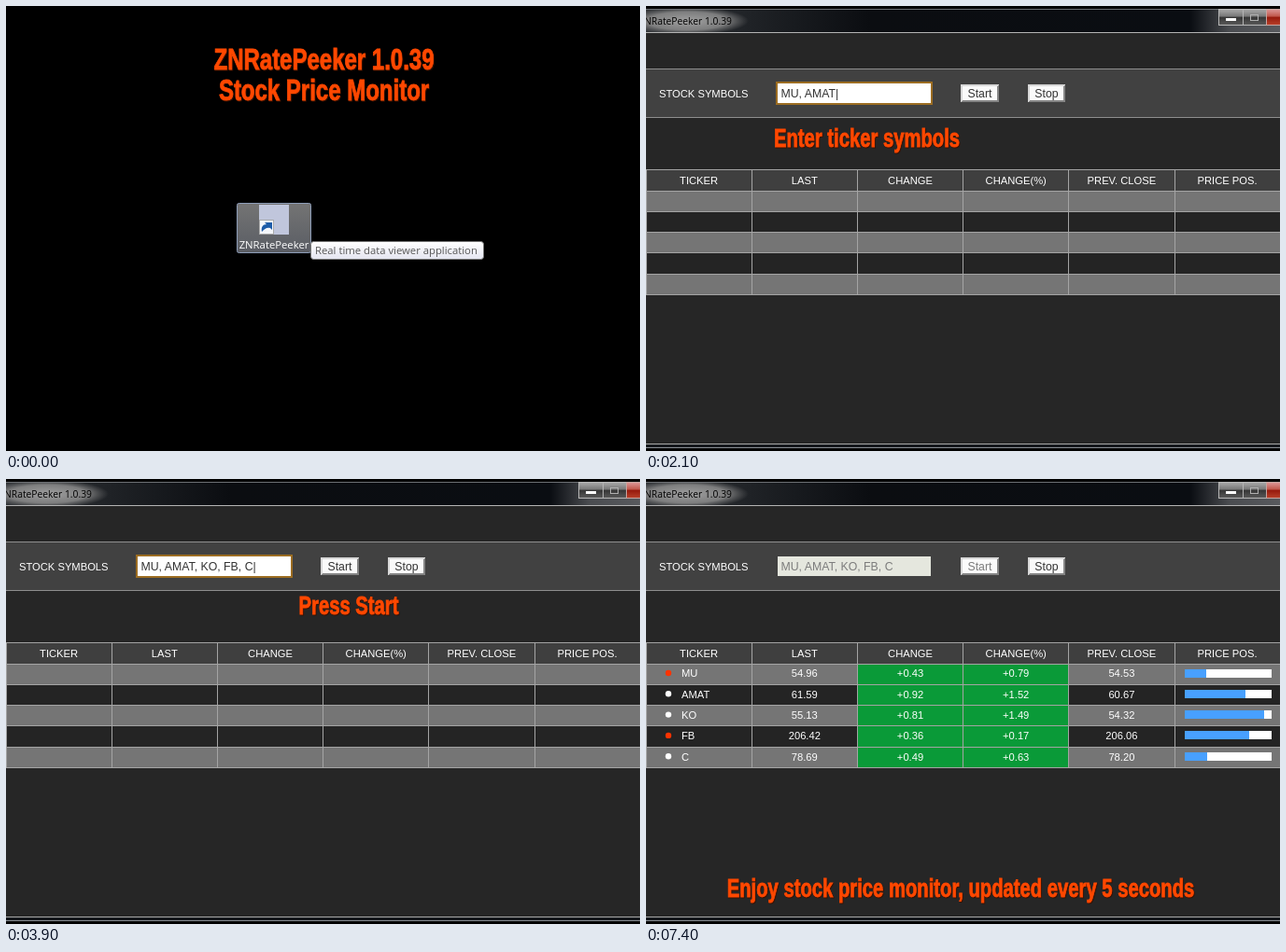
Animation of 679x477 px, one loop 8000 ms. Source, as an HTML page:

```html
<!DOCTYPE html>
<html lang="en">
<head>
<meta charset="utf-8">
<title>Stock Price Monitor</title>
<style>
  html, body { margin: 0; width: 100%; height: 100%; overflow: hidden; background: #000; }
  svg { display: block; width: 679px; height: 477px; }
  text { font: 11.2px "Liberation Sans", Arial, sans-serif; fill: #fff; white-space: pre; }
  .mid { text-anchor: middle; }
  .end { text-anchor: end; }
  .field { font-size: 12.3px; fill: #333; }
  .off { fill: #7c7c7c; }
  .system { font: 11.3px "Open Sans", "Noto Sans", sans-serif; }
  .bar { font-size: 10.3px; fill: #000; }
  .caption { font-weight: bold; fill: #ff4800; stroke: #ff4800; stroke-width: .9; filter: drop-shadow(1px 1px 0 #3a1000); }
  rect, path { shape-rendering: crispEdges; }
  .smooth { shape-rendering: auto; }
</style>
</head>
<body>
<svg id="stage" viewBox="0 0 679 477">
  <defs>
    <linearGradient id="titleBar">
      <stop offset="0" stop-color="#33363a"/><stop offset=".16" stop-color="#202327"/>
      <stop offset=".35" stop-color="#0b0d11"/><stop offset=".84" stop-color="#0a0d12"/>
      <stop offset=".9" stop-color="#4a4c50"/><stop offset="1" stop-color="#5c5e62"/>
    </linearGradient>
    <radialGradient id="glow">
      <stop offset="0" stop-color="#a0a0a0"/><stop offset=".65" stop-color="#8c8c8c" stop-opacity=".85"/>
      <stop offset="1" stop-color="#777" stop-opacity="0"/>
    </radialGradient>
    <linearGradient id="button" x2="0" y2="1">
      <stop offset="0" stop-color="#aaa"/><stop offset=".45" stop-color="#777"/>
      <stop offset=".5" stop-color="#363636"/><stop offset="1" stop-color="#5a5a5a"/>
    </linearGradient>
    <linearGradient id="close" x2="0" y2="1">
      <stop offset="0" stop-color="#d99"/><stop offset=".45" stop-color="#c0564a"/>
      <stop offset=".5" stop-color="#96190c"/><stop offset="1" stop-color="#b8412a"/>
    </linearGradient>
    <linearGradient id="tip" x2="0" y2="1">
      <stop offset="0" stop-color="#fff"/><stop offset="1" stop-color="#e4e5f0"/>
    </linearGradient>
    <linearGradient id="selected" x2="0" y2="1">
      <stop offset="0" stop-color="#747474"/><stop offset="1" stop-color="#5a5d64"/>
    </linearGradient>
  </defs>
  <g id="scene"></g>
</svg>
<script>
const APP = "ZNRatePeeker";
const GREEN = "#0a9a38", RED = "#ff3300", WHITE = "#fff";
const HEADERS = ["TICKER", "LAST", "CHANGE", "CHANGE(%)", "PREV. CLOSE", "PRICE POS."];
const TICKERS = ["MU", "AMAT", "KO", "FB", "C"];
const CLOSES = [54.53, 60.67, 54.32, 206.06, 78.20];
const COL = 113.2, ROW = 22.3, TABLE_TOP = 175.5, BODY_TOP = 198;

const rect = (x, y, w, h, fill, extra = "") =>
  `<rect x="${x}" y="${y}" width="${w}" height="${h}" fill="${fill}" ${extra}/>`;
const text = (x, y, label, cls = "") => `<text x="${x}" y="${y}" class="${cls}">${label}</text>`;
const line = (d, color = "#a4a4a4") => `<path d="${d}" fill="none" stroke="${color}"/>`;

// Captions use a condensed bold face.
const caption = (x, y, label, size = 27) =>
  `<g transform="translate(${x} ${y}) scale(.75 1)"><text class="caption mid" style="font-size:${size}px">${label}</text></g>`;

function desktop() {
  return rect(0, 0, 679, 477, "#000")
    + caption(340.5, 68, APP + " 1.0.39", 32)
    + caption(340.5, 101, "Stock Price Monitor", 32)
    + rect(247.5, 211.5, 79, 53, "url(#selected)", 'rx="2" stroke="#8d9db8" class="smooth"')
    + rect(271, 213, 32, 32, "#c0c6dc")
    + rect(271.5, 229.5, 15, 15, "#f4f6fa", 'stroke="#aaa"')
    + '<path class="smooth" d="M274 242c-1-5 1-8 5-8l-2-2h8v8l-2-2c-4-1-6 1-9 4z" fill="#1d5ca8"/>'
    + text(287, 260, APP, "system mid")
    + rect(326.5, 252.5, 185, 19, "url(#tip)", 'rx="3" stroke="#767676" class="smooth"')
    + `<g style="--c:#575757">${text(331, 266, "Real time data viewer application", "system").replace("<text", '<text style="fill:#575757"')}</g>`;
}

function windowFrame() {
  return rect(-5, 3, 700, 25, "url(#titleBar)")
    + '<ellipse cx="44" cy="16" rx="66" ry="15" fill="url(#glow)"/>'
    + rect(-5, -5, 700, 8, "#000")
    + line("M-5 3.5H690", "#6d7074") + line("M-5 28.5H690", "#b4b4b4")
    + text(92, 20, APP + " 1.0.39", "system bar end")
    + rect(613.5, 3.5, 26, 17, "url(#button)", 'stroke="#b5b5b5"')
    + rect(639.5, 3.5, 25, 17, "url(#button)", 'stroke="#b5b5b5"')
    + rect(664.5, 3.5, 40, 17, "url(#close)", 'stroke="#c5a5a0"')
    + rect(621, 13, 11, 3, WHITE)
    + rect(647.5, 9.5, 8, 6, "none", 'stroke="#b0b0b0"')
    + rect(-5, 29, 700, 441, "#262626")
    + line("M-5 469.5H690", "#a8a8a8")
    + rect(-5, 470, 700, 3, "#15181c")
    + line("M-5 473.5H690", "#8a9096");
}

function pushButton(x, w, label, disabled) {
  return rect(x, 84, w, 19, "#d8d8d8")
    + `<path d="M${x + w} 84v19h${-w}l2-2h${w - 4}v-15z" fill="#858585"/>`
    + rect(x + 2, 86, w - 4, 15, "#fafafa")
    + text(x + w / 2, 98, label, "field mid" + (disabled ? " off" : ""));
}

function inputPanel({ entry = "", focus, caret, running }) {
  const field = focus
    ? rect(139, 81, 168, 25, "#9c6d22") + rect(141, 83, 164, 21, WHITE)
    : rect(141, 83, 164, 21, running ? "#e5e7de" : WHITE);
  return rect(-.5, 67.5, 679.5, 52, "#414141", 'stroke="#8e8e8e"')
    + text(14, 97.5, "STOCK SYMBOLS")
    + field
    + text(144.5, 97.5, entry + (caret ? "|" : ""), "field" + (running ? " off" : ""))
    + pushButton(337, 41, "Start", running)
    + pushButton(409, 40, "Stop");
}

function quoteRow(quote, i) {
  const [last, position, dot] = quote;
  const y = BODY_TOP + ROW * i, base = y + 14.3;
  const gain = last - CLOSES[i];
  const values = [last.toFixed(2), "+" + gain.toFixed(2), "+" + (gain / CLOSES[i] * 100).toFixed(2), CLOSES[i].toFixed(2)];
  return rect(2 * COL, y, 2 * COL, ROW, GREEN)
    + `<circle cx="24" cy="${y + 10}" r="3.2" fill="${dot}"/>`
    + text(38, base, TICKERS[i])
    + values.map((v, c) => text(COL * (c + 1.5), base, v, "mid")).join("")
    + rect(577, y + 5.5, 93, 9, WHITE) + rect(577, y + 5.5, 93 * position, 9, "#48a0ff");
}

function table(quotes) {
  const bottom = BODY_TOP + 5 * ROW;
  let out = rect(0, TABLE_TOP, 6 * COL, 22.5, "#3f3f3f"), grid = `M0 ${TABLE_TOP}H${6 * COL}`;
  for (let i = 0; i < 5; i++) out += rect(0, BODY_TOP + i * ROW, 6 * COL, ROW, i % 2 ? "#242424" : "#757575");
  if (quotes) out += quotes.map(quoteRow).join("");
  for (let i = 0; i < 6; i++) grid += `M0 ${BODY_TOP + i * ROW}H${6 * COL}`;
  for (let i = 0; i < 7; i++) grid += `M${i * COL} ${TABLE_TOP}V${bottom}`;
  return out + line(grid)
    + HEADERS.map((h, c) => text(COL * (c + .5), 190.5, h, "mid")).join("");
}

function appWindow(state) {
  const { x = 0, y = 0, zoom = 1 } = state;
  return rect(0, 0, 679, 477, "#000")
    + `<g transform="translate(${x} ${y}) scale(${zoom})">`
    + windowFrame() + inputPanel(state) + table(state.quotes) + "</g>"
    + caption(...state.caption);
}

const typed = count => TICKERS.slice(0, count).join(", ");
const ENTER = [236.5, 150.5, "Enter ticker symbols"];
const PRESS = [367, 145, "Press Start"];
const ENJOY = [337, 447.5, "Enjoy stock price monitor, updated every 5 seconds"];
const typing = (count, caret) => ({ entry: typed(count), focus: true, caret, caption: ENTER });
const running = (quotes, camera) => ({ entry: typed(5), running: true, quotes, caption: ENJOY, ...camera });

const timeline = [
  [0, null],
  [500, { caption: ENTER, y: .8, zoom: .998 }],
  [1500, typing(1, true)],
  [2100, typing(2, true)],
  [2700, typing(3, false)],
  [3300, typing(4, true)],
  [3900, { ...typing(5, true), caption: PRESS }],
  [5400, running([[54.95, .25, GREEN], [61.59, .70, WHITE], [55.16, .96, WHITE], [206.42, .74, WHITE], [78.70, .28, GREEN]],
    { x: 1.5, y: -.5, zoom: .996 })],
  [6400, running([[54.97, .26, GREEN], [61.59, .70, WHITE], [55.13, .915, RED], [206.43, .75, GREEN], [78.69, .26, RED]])],
  [7400, running([[54.96, .25, RED], [61.59, .70, WHITE], [55.13, .915, WHITE], [206.42, .74, RED], [78.69, .26, WHITE]])],
];

const scene = document.getElementById("scene");
let shown;
function draw() {
  const time = performance.now() % 8000;
  const step = timeline.findLast(([start]) => start <= time);
  if (step !== shown) {
    shown = step;
    scene.innerHTML = step[1] ? appWindow(step[1]) : desktop();
  }
  requestAnimationFrame(draw);
}
draw();
</script>
</body>
</html>
```
